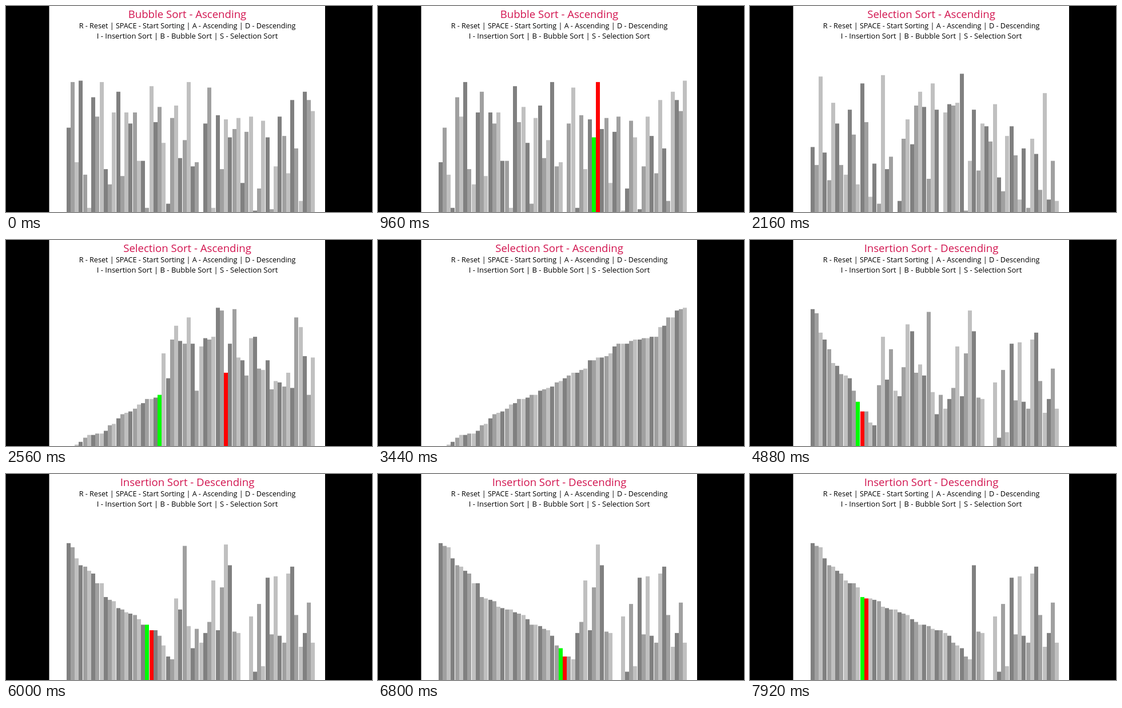
Animation, 640 px wide and 360 px high, one loop 8 s. Source, as an HTML page with a canvas:

```html
<!DOCTYPE html>
<html lang="en">
<head>
<meta charset="utf-8">
<title>Sorting visualizer</title>
<style>
html, body { margin: 0; width: 100%; height: 100%; overflow: hidden; background: #000; }
.stage { position: absolute; left: 0; top: 0; width: 640px; height: 360px; overflow: hidden; }
canvas, svg { position: absolute; left: 0; top: 0; display: block; }
text { font-family: "Open Sans", sans-serif; text-anchor: middle; fill: #000; }
#title { font-size: 18.6px; fill: #d2144f; }
</style>
</head>
<body>
<div class="stage">
  <canvas id="bars" width="640" height="360"></canvas>
  <svg width="640" height="360" viewBox="0 0 640 360">
    <text id="title" x="317" y="21">Bubble Sort - Ascending</text>
    <text x="317" y="39" font-size="12.6">R - Reset | SPACE - Start Sorting | A - Ascending | D - Descending</text>
    <text x="317" y="57" font-size="13">I - Insertion Sort | B - Bubble Sort | S - Selection Sort</text>
  </svg>
</div>
<script>
const LOOP = 8000, TICK = 80;
const LEFT = 105.5, BAR = 7.25, UNIT = 2.416, BASE = 360;
const GRAYS = ['#808080', '#a0a0a0', '#c0c0c0'];
const GREEN = '#00ff00', RED = '#ff0000';

const bubbleList = [
  61, 94, 36, 95, 27, 3, 83, 69, 94, 31, 20, 72, 87, 26, 72, 64, 72, 37, 37, 3,
  91, 65, 76, 50, 6, 68, 77, 39, 52, 94, 33, 36, 0, 64, 90, 3, 70, 31, 67, 54,
  60, 68, 21, 58, 69, 1, 17, 66, 54, 2, 33, 69, 55, 28, 81, 46, 8, 87, 81, 73
];
const selectionList = [
  47, 34, 98, 43, 23, 79, 64, 34, 27, 74, 56, 20, 93, 65, 11, 35, 6, 99, 31, 40,
  0, 8, 53, 67, 49, 77, 87, 76, 24, 93, 74, 0, 72, 78, 77, 79, 100, 1, 37, 74,
  30, 64, 62, 51, 78, 25, 15, 55, 62, 41, 9, 46, 3, 53, 42, 16, 86, 9, 37, 8
];
const insertionList = [
  60, 25, 82, 40, 15, 70, 51, 58, 99, 32, 77, 17, 52, 96, 49, 47, 44, 79, 48, 70,
  40, 36, 57, 88, 83, 53, 59, 51, 97, 39, 23, 37, 27, 34, 42, 72, 36, 67, 98, 83,
  35, 34, 0, 0, 46, 6, 55, 10, 74, 33, 75, 32, 27, 77, 82, 47, 24, 34, 56, 27
];

// Each sort yields the two highlighted positions: [green, red].
function* bubbleSort(a) {
  for (let end = a.length - 1; end > 0; end--)
    for (let j = 0; j < end; j++)
      if (a[j] > a[j + 1]) {
        [a[j], a[j + 1]] = [a[j + 1], a[j]];
        yield [j, j + 1];
      }
}

function* selectionSort(a) {
  for (let i = 0; i < a.length; i++) {
    let min = i;
    for (let j = i + 1; j < a.length; j++) if (a[j] < a[min]) min = j;
    [a[i], a[min]] = [a[min], a[i]];
    yield [i, min];
  }
}

function* insertionSortDesc(a) {
  for (let i = 1; i < a.length; i++) {
    const key = a[i];
    let j = i;
    while (j > 0 && a[j - 1] < key) {
      a[j] = a[j - 1];
      j--;
      yield [j - 1, j];
    }
    a[j] = key;
  }
}

function record(list, sort) {
  const a = list.slice();
  const states = [{ list: a.slice(), green: -1, red: -1 }];
  for (const [green, red] of sort(a)) states.push({ list: a.slice(), green, red });
  states.push({ list: a.slice(), green: -1, red: -1 });
  return states;
}

// keys: [time, step] pairs
const scenes = [
  { until: 1600, states: record(bubbleList, bubbleSort), keys: [[0, 0], [1520, 146]] },
  { until: 3680, states: record(selectionList, selectionSort), keys: [[2320, 0], [2960, 61]] },
  { until: LOOP, states: record(insertionList, insertionSortDesc),
    keys: [[4240, 0], [4880, 59], [6000, 168], [6800, 245], [7920, 350]] }
];
const titles = [
  [1920, 'Bubble Sort - Ascending'],
  [3840, 'Selection Sort - Ascending'],
  [4000, 'Insertion Sort - Ascending'],
  [LOOP, 'Insertion Sort - Descending']
];

function stepAt(keys, t) {
  if (t <= keys[0][0]) return keys[0][1];
  for (let k = 1; k < keys.length; k++) {
    const [t0, s0] = keys[k - 1], [t1, s1] = keys[k];
    if (t <= t1) return Math.round(s0 + (s1 - s0) * (t - t0) / (t1 - t0));
  }
  return keys[keys.length - 1][1];
}

const ctx = document.getElementById('bars').getContext('2d');
const title = document.getElementById('title');

function draw(t) {
  const scene = scenes.find(s => t < s.until);
  const { list, green, red } = scene.states[stepAt(scene.keys, t)];
  ctx.fillStyle = '#000';
  ctx.fillRect(0, 0, 640, 360);
  ctx.fillStyle = '#fff';
  ctx.fillRect(75.5, 0, 482.5, 360);
  list.forEach((v, i) => {
    const x = Math.round(LEFT + i * BAR);
    const next = Math.round(LEFT + (i + 1) * BAR - 0.01);
    ctx.fillStyle = i === red ? RED : i === green ? GREEN : GRAYS[i % 3];
    ctx.fillRect(x, BASE - v * UNIT, next - x, v * UNIT);
  });
  const label = titles.find(entry => t < entry[0])[1];
  if (title.textContent !== label) title.textContent = label;
}

let start;
function loop() {
  const now = performance.now();
  if (start === undefined) start = now;
  draw(Math.floor((now - start) % LOOP / TICK) * TICK);
  requestAnimationFrame(loop);
}
loop();
</script>
</body>
</html>
```
